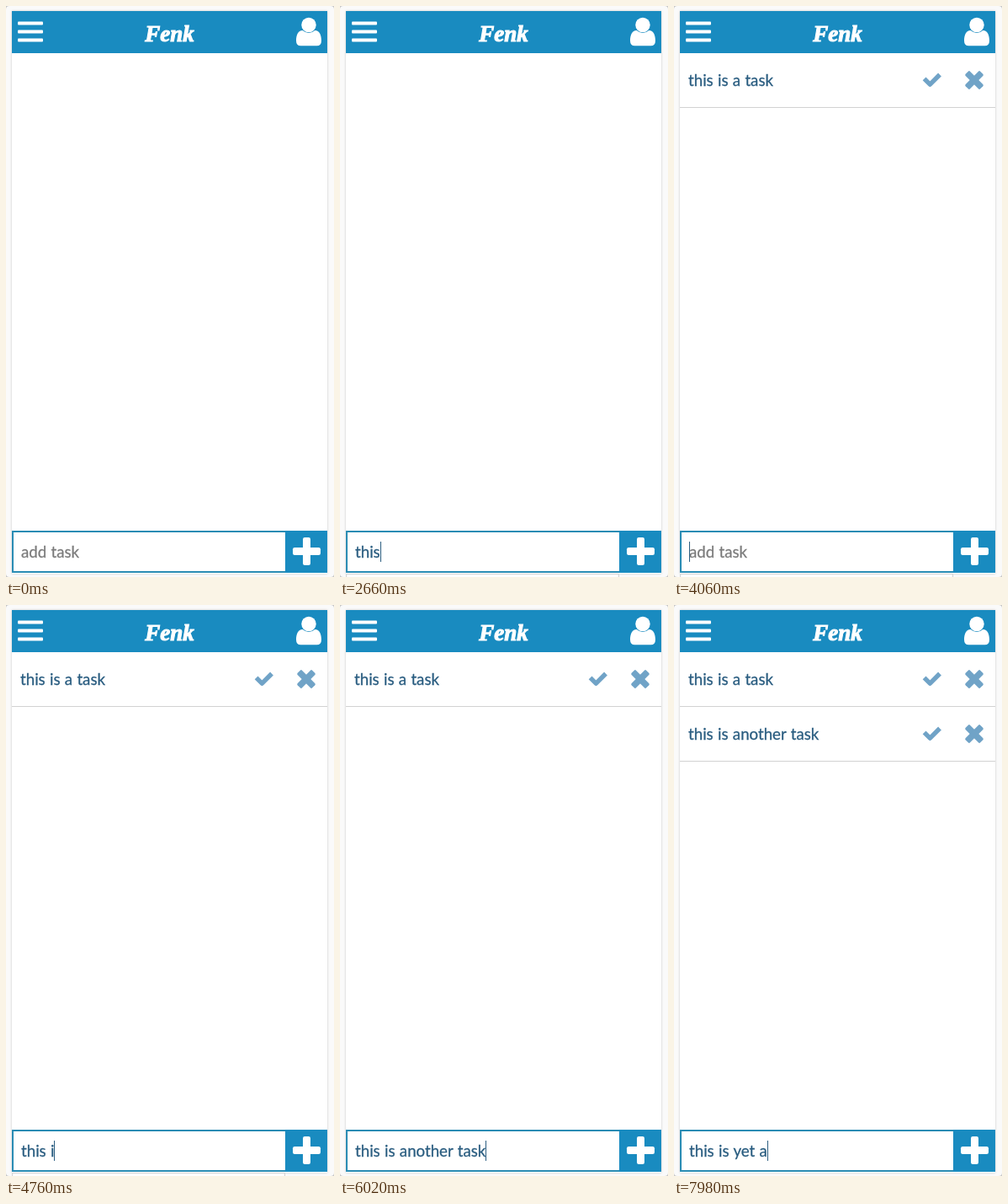
An HTML page for the animation above (8 s loop, 390 by 678 pixels).

```html
<!DOCTYPE html>
<html lang="en">
<head>
<meta charset="utf-8">
<title>Task list</title>
<style>
  html, body { margin: 0; width: 100%; height: 100%; overflow: hidden; background: #c4c4c4; }
  svg { display: block; width: 390px; height: 678px; }
  text { font: 18.7px Lato, "Open Sans", sans-serif; word-spacing: .5px; white-space: pre; fill: #2a5d80; stroke: #2a5d80; stroke-width: .3px; }
  .title { font: italic bold 27px "Liberation Serif", "Noto Serif", serif; fill: #fff; stroke: #fff; stroke-width: 1.1px; text-anchor: middle; }
  .hint { fill: #7c7c7c; stroke: #7c7c7c; }
  .blue { fill: #198bc0; }
  .edge { fill: #fff; stroke: #2a8cb4; stroke-width: 2px; }
  .white { fill: #fff; }
  .icon { fill: #70a3c7; }
  .tick { fill: none; stroke: #70a3c7; stroke-width: 5.4px; stroke-linejoin: round; }
  .line { fill: #d2d2d2; }
  .caret { fill: #2a5d80; }
</style>
</head>
<body>
<svg viewBox="0 0 390 678">
  <defs>
    <filter id="soft" x="-5%" y="-5%" width="110%" height="110%"><feGaussianBlur stdDeviation="1.6"/></filter>
    <g id="actions">
      <path class="tick" d="M297.6 86.3 304.4 93.1 316 81.5"/>
      <g class="icon" transform="translate(357 88)">
        <rect x="-12.4" y="-3.8" width="24.8" height="7.6" rx="1.6" transform="rotate(45)"/>
        <rect x="-12.4" y="-3.8" width="24.8" height="7.6" rx="1.6" transform="rotate(-45)"/>
      </g>
      <rect class="line" x="7" y="120" width="375" height="1"/>
    </g>
  </defs>

  <rect width="390" height="678" rx="4" fill="#fafafa"/>
  <rect x="7" y="6" width="375" height="668" fill="#000" opacity=".2" filter="url(#soft)"/>
  <rect class="white" x="7" y="6" width="375" height="668"/>

  <rect class="blue" x="7" y="6" width="375" height="50"/>
  <g class="white">
    <rect x="14" y="18.4" width="30" height="4" rx="1"/>
    <rect x="14" y="28.4" width="30" height="4" rx="1"/>
    <rect x="14" y="38.4" width="30" height="4" rx="1"/>
    <circle cx="360" cy="22.5" r="8.7"/>
    <path d="M352.6 29Q360 35 367.4 29C373 29.2 375 35 375 41.3Q375 47.3 369.5 47.3H350.5Q345 47.3 345 41.3C345 35 347 29.2 352.6 29Z"/>
  </g>
  <text class="title" x="194.5" y="42">Fenk</text>

  <g class="row"><text x="17" y="95">this is a task</text><use href="#actions"/></g>
  <g class="row"><text x="17" y="160">this is another task</text><use href="#actions" y="65"/></g>

  <path id="drop" d="M7.5 678V674.5H331.5V678" fill="#fff" stroke="#d2d2d2"/>
  <rect class="edge" x="8" y="624" width="325" height="48"/>
  <rect class="blue" x="332" y="623" width="50" height="50"/>
  <g class="white">
    <rect x="341" y="643" width="33" height="9" rx="2.2"/>
    <rect x="353" y="631" width="9" height="33" rx="2.2"/>
  </g>
  <text id="hint" class="hint" x="18" y="655">add task</text>
  <text id="entry" x="18" y="655"></text>
  <rect id="caret" class="caret" x="18" y="636" width="1" height="24"/>
</svg>
<script>
const LOOP = 8000, KEY = 70, BLINK = 490, FOCUS = 1680;
const [drop, hint, entry, caret] =
  ["drop", "hint", "entry", "caret"].map(id => document.getElementById(id));
const rows = document.querySelectorAll(".row");

// Bursts of typing, one letter per KEY ms, until the task is sent.
const tasks = [
  { sent: 4060, bursts: [[2450, "this "], [2870, "is a "], [3290, "task"]] },
  { sent: 6370, bursts: [[4340, "this "], [4760, "is a"], [5110, "not"], [5460, "her "], [5810, "task"]] },
  { sent: LOOP, bursts: [[6720, "this "], [7140, "is "], [7560, "yet "], [7910, "a"]] }
];
const firstKey = tasks[0].bursts[0][0];

const show = (el, on) => el.setAttribute("visibility", on ? "visible" : "hidden");
const typed = (task, t) => task.bursts
  .map(([at, text]) => text.slice(0, Math.max(0, Math.floor((t - at) / KEY) + 1)))
  .join("");

function draw(t) {
  const task = tasks.findLast(({ bursts }) => t >= bursts[0][0]);
  const last = task ? typed(task, t) : "";
  const value = task && t < task.sent ? last : "";
  entry.textContent = value;
  caret.setAttribute("x", 18 + (value ? Math.round(entry.getComputedTextLength()) : 0));

  show(hint, !value);
  show(caret, t >= firstKey || (t >= FOCUS && t < FOCUS + BLINK));
  rows.forEach((row, i) => show(row, t >= tasks[i].sent));
  // The suggestion box stays open while an earlier entry still matches.
  show(drop, last && "this is a task".startsWith(last));
}

const start = performance.now();
function tick(now) {
  draw(Math.max(0, now - start) % LOOP);
  requestAnimationFrame(tick);
}
draw(0);
requestAnimationFrame(tick);
</script>
</body>
</html>
```
